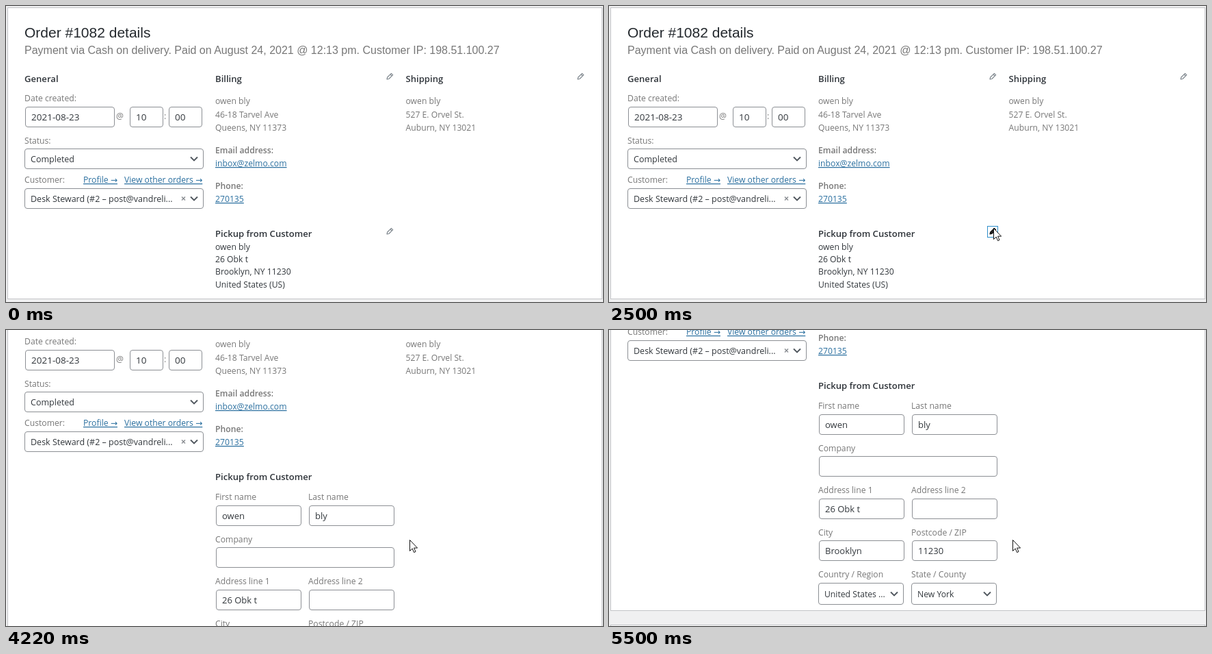
Recreate the animation shown at these times as an HTML page. Size 873x432 px, loop 7610 ms.

```html
<!DOCTYPE html>
<html lang="en">
<head>
<meta charset="utf-8">
<title>Order details</title>
<style>
html, body { margin: 0; width: 100%; height: 100%; overflow: hidden; background: #f0f0f1; }
svg { display: block; width: 873px; height: 432px; }
text { font: 12.2px "Open Sans", "DejaVu Sans", sans-serif; fill: #777; white-space: pre; }
.title { font: 21px "Liberation Sans", Arial, sans-serif; fill: #23282d; }
.sub { font: 16px "Liberation Sans", Arial, sans-serif; }
.head { font-size: 13.1px; font-weight: 600; fill: #2f343a; }
.bold { font-weight: 600; }
.dark { fill: #32373c; }
.option { font-size: 12.5px; fill: #32373c; }
.value { font-size: 13px; fill: #32373c; }
.num { font-size: 13.5px; fill: #32373c; }
.link { fill: #2a6f9f; text-decoration: underline; }
.panel { fill: #fff; stroke: #c3c4c7; }
.field { fill: #fff; stroke: #8c8f94; }
.chevron { fill: none; stroke: #50575e; stroke-width: 1.9; }
.clear { fill: none; stroke: #85898e; stroke-width: 1.3; }
.pencil { fill: #fff; stroke: #7f878e; stroke-width: 1.2; stroke-linejoin: round; }
.active .pencil { fill: #222; stroke: #111; }
</style>
</head>
<body>
<svg viewBox="0 0 873 432">
  <g id="page">
    <rect id="panel" class="panel" x="2.5" y="2.5" width="869" height="425"/>
    <rect id="next" class="panel" x="2.5" y="681.5" width="869" height="200"/>
    <g id="base"></g>
    <g id="view"></g>
    <g id="form"></g>
  </g>
  <path id="cursor" d="M.5.5V16.5L4.2 13L6.6 18.6L9 17.5L6.6 12.1H11.6Z" fill="#fff" stroke="#111" stroke-linejoin="round"/>
</svg>
<script>
const $ = id => document.getElementById(id);
const base = $('base'), view = $('view'), form = $('form');

function add(parent, tag, attrs, body) {
  const el = document.createElementNS('http://www.w3.org/2000/svg', tag);
  for (const key in attrs) el.setAttribute(key, attrs[key]);
  if (body) el.textContent = body;
  parent.appendChild(el);
  return el;
}
const text = (parent, x, y, body, cls = '') => add(parent, 'text', { x, y, class: cls }, body);
const lines = (parent, x, ys, rows, cls) => rows.forEach((row, i) => text(parent, x, ys[i], row, cls));
const field = (parent, x, y, width, height = 30) =>
  add(parent, 'rect', { x: x + .5, y: y + .5, width: width - 1, height: height - 1, rx: 3.5, class: 'field' });
const chevron = (parent, x, y) =>
  add(parent, 'path', { d: `M${x - 5} ${y - 2.5}l5 5l5 -5`, class: 'chevron' });

function input(parent, x, y, width, body, cls = 'value') {
  field(parent, x, y, width);
  if (body) text(parent, x + 9, y + 20, body, cls);
}
function select(parent, x, y, width, height, body, cls = 'dark') {
  field(parent, x, y, width, height);
  text(parent, x + 9, y + height / 2 + 5, body, cls);
  chevron(parent, x + width - 14, y + height / 2);
}
function pencil(parent, x, y) {
  const g = add(parent, 'g', { transform: `translate(${x} ${y}) rotate(45)` });
  add(g, 'path', { d: 'M-1.6 -5H1.6V3L0 5.6L-1.6 3ZM-1.6 -2.8H1.6', class: 'pencil' });
}

text(base, 27, 46, 'Order #1082 details', 'title');
text(base, 27, 70, 'Payment via Cash on delivery. Paid on August 24, 2021 @ 12:13 pm. Customer IP: 198.51.100.27', 'sub');

text(base, 27, 111, 'General', 'head');
text(base, 27, 139, 'Date created:');
input(base, 28, 147, 131, '2021-08-23', 'num');
text(base, 161, 165, '@');
input(base, 181, 147, 49, '10', 'num');
text(base, 231, 165, ':');
input(base, 238, 147, 49, '00', 'num');
text(base, 27, 201, 'Status:');
select(base, 27, 208, 262, 30, 'Completed', 'option');
text(base, 27, 258, 'Customer:');
text(base, 113, 258, 'Profile →', 'link');
text(base, 173, 258, 'View other orders →', 'link');
select(base, 27, 266, 262, 30, 'Desk Steward (#2 – post@vandreli...', 'option');
add(base, 'path', { d: 'M257 278.5l5 5m0 -5l-5 5', class: 'clear' });

text(base, 306, 111, 'Billing', 'head');
lines(base, 306, [143, 163, 182], ['owen bly', '46-18 Tarvel Ave', 'Queens, NY 11373']);
text(base, 306, 215, 'Email address:', 'bold');
text(base, 306, 234, 'inbox@zelmo.com', 'link');
text(base, 306, 267, 'Phone:', 'bold');
text(base, 306, 286, '270135', 'link');
pencil(base, 561, 103);

text(base, 584.5, 111, 'Shipping', 'head');
lines(base, 584.5, [143, 163, 182], ['owen bly', '527 E. Orvel St.', 'Auburn, NY 13021']);
pencil(base, 840, 103);

text(base, 306, 337, 'Pickup from Customer', 'head');
lines(view, 306, [356, 374, 392, 411],
  ['owen bly', '26 Obk t', 'Brooklyn, NY 11230', 'United States (US)'], 'dark');
const ring = add(view, 'rect', { x: 553.5, y: 321.5, width: 15, height: 16, fill: '#fff', stroke: '#2f8fcb' });
pencil(view, 561, 329);

// label baseline, field top, labels, values
const rows = [
  [366, 374, 'First name', 'Last name', 'owen', 'bly'],
  [489, 497, 'Address line 1', 'Address line 2', '26 Obk t', ''],
  [551, 558, 'City', 'Postcode / ZIP', 'Brooklyn', '11230']
];
for (const [y, top, left, right, a, b] of rows) {
  text(form, 306, y, left);
  text(form, 442, y, right);
  input(form, 307, top, 125, a);
  input(form, 443, top, 125, b);
}
text(form, 306, 428, 'Company');
input(form, 307, 435, 261, '');
text(form, 306, 612, 'Country / Region');
text(form, 442, 612, 'State / County');
select(form, 306, 620, 125, 32, 'United States ...');
select(form, 442, 620, 125, 32, 'New York');

// time, scroll, cursor x, cursor y, state
const HIDDEN = 0, IDLE = 1, HOVER = 2, FOCUS = 3, EDIT = 4;
const steps = [
  [0, 0, 562, 338, HIDDEN],
  [1310, 0, 562, 338, IDLE],
  [1580, 0, 562, 331, HOVER],
  [1650, 0, 562, 324, HOVER],
  [2440, 0, 562, 324, FOCUS],
  [3490, 0, 562, 324, EDIT],
  [3550, 0, 569, 319, EDIT],
  [3620, 0, 577, 313, EDIT],
  [3690, 14, 582, 310, EDIT],
  [3760, 42, 584, 309, EDIT],
  [3830, 66, 584, 309, EDIT],
  [3890, 66, 590, 306, EDIT],
  [4090, 82, 590, 306, EDIT],
  [4150, 104, 590, 306, EDIT],
  [4220, 118, 590, 306, EDIT],
  [4750, 136, 590, 306, EDIT],
  [4820, 162, 590, 306, EDIT],
  [4890, 186, 590, 306, EDIT],
  [4950, 199, 590, 306, EDIT],
  [5360, 215, 590, 306, EDIT],
  [5430, 237, 590, 306, EDIT],
  [5500, 251, 590, 306, EDIT]
];
const LOOP = 7610;
const show = (el, on) => el.setAttribute('visibility', on ? 'visible' : 'hidden');

function draw(now) {
  const t = now % LOOP;
  const [, scroll, x, y, state] = steps.findLast(step => step[0] <= t);
  const edit = state === EDIT;
  $('page').setAttribute('transform', `translate(0 ${-scroll})`);
  $('panel').setAttribute('height', edit ? 658 : 425);
  show($('next'), edit);
  show(view, !edit);
  show(form, edit);
  show(ring, state === FOCUS);
  view.setAttribute('class', state === HOVER || state === FOCUS ? 'active' : '');
  $('cursor').setAttribute('transform', `translate(${x} ${y})`);
  show($('cursor'), state !== HIDDEN);
}
const start = performance.now();
function tick() {
  draw(performance.now() - start);
  requestAnimationFrame(tick);
}
tick();
</script>
</body>
</html>
```
